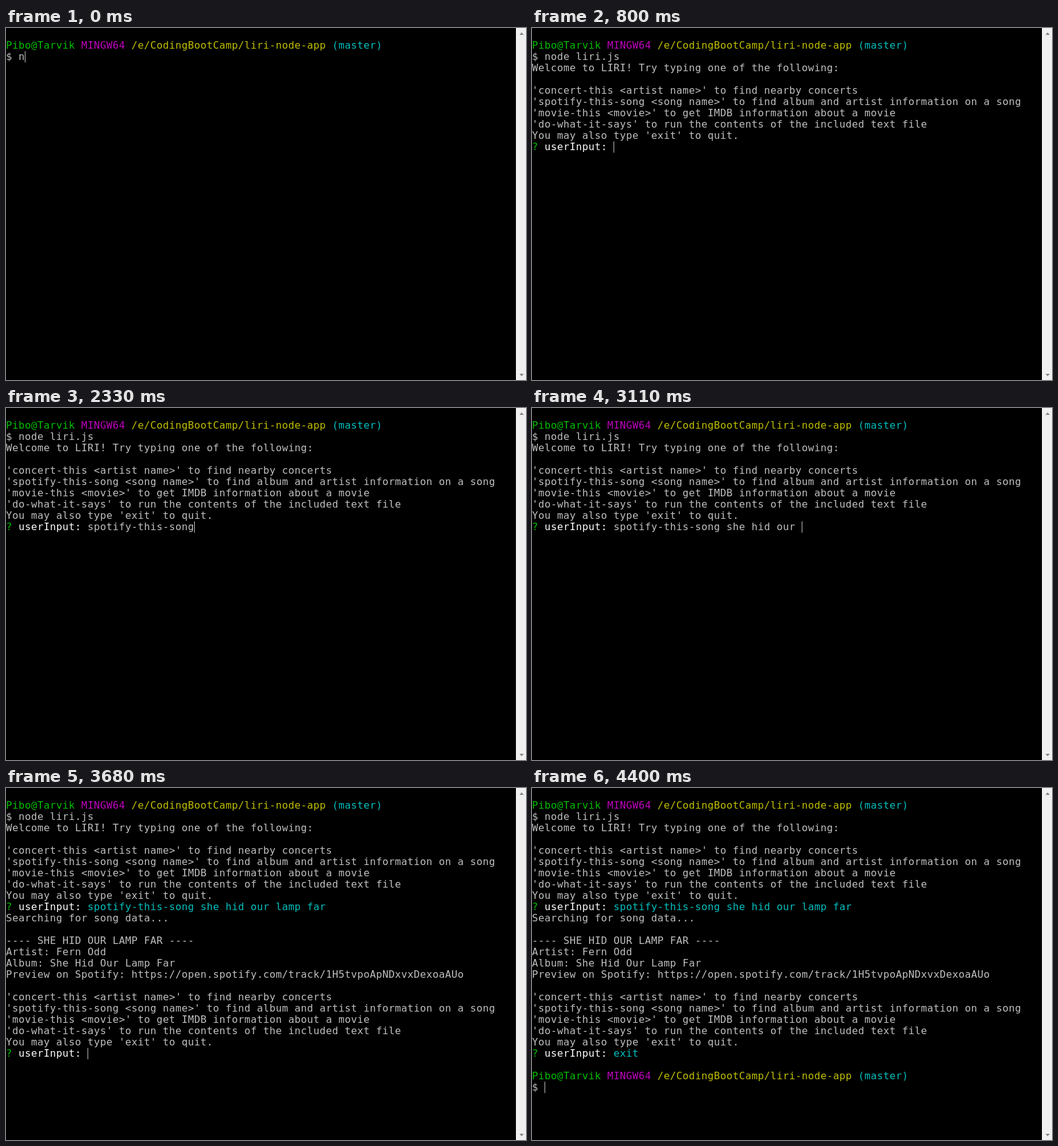
An HTML page for the animation above (4490 ms loop, 829x562 px).

```html
<!DOCTYPE html>
<html lang="en">
<head>
<meta charset="utf-8">
<title>Terminal session</title>
<style>
  html, body { margin: 0; width: 100%; height: 100%; overflow: hidden; background: #000; }
  #screen {
    position: absolute; left: 0; top: 1px; margin: 0; color: #bfbfbf;
    font: 16px/18px "DejaVu Sans Mono", monospace;
    letter-spacing: calc(10px - 1ch); /* 10px character cells */
    font-variant-ligatures: none; white-space: pre;
  }
  #cursor { position: absolute; width: 1px; height: 18px; background: #bfbfbf; }
  svg { position: absolute; left: 813px; top: 0; background: #f0f0f0; }
</style>
</head>
<body>
<pre id="screen"></pre>
<div id="cursor"></div>
<svg width="16" height="562" fill="#868686">
  <path d="M0 0H1V562H0Z" fill="#fff"/>
  <path d="M5.5 11 L9 7 L12.5 11Z M5.5 552 L9 556 L12.5 552Z"/>
</svg>
<script>
const LOOP = 4490;
const GREEN = '#00bf00', MAGENTA = '#bf00bf', YELLOW = '#bfbf00',
      CYAN = '#00bfbf', GREY = '#bfbfbf', WHITE = '#fff';

const song = 'she hid our lamp far';
const titleCase = song.replace(/\b\w/g, c => c.toUpperCase());
const query = 'spotify-this-song ' + song;
const command = 'node liri.js ';

const menu = `
'concert-this <artist name>' to find nearby concerts
'spotify-this-song <song name>' to find album and artist information on a song
'movie-this <movie>' to get IMDB information about a movie
'do-what-it-says' to run the contents of the included text file
You may also type 'exit' to quit.
`;
const result = `---- ${song.toUpperCase()} ----
Artist: Fern Odd
Album: ${titleCase}
Preview on Spotify: https://open.spotify.com/track/1H5tvpoApNDxvxDexoaAUo
`;

// A screen is a list of [text, colour] runs; the cursor follows the last one.
const shell = [
  ['\nPibo@Tarvik ', GREEN], ['MINGW64 ', MAGENTA],
  ['/e/CodingBootCamp/liri-node-app ', YELLOW], ['(master)\n', CYAN], ['$ ', GREY]
];
const ask = [['? ', GREEN], ['userInput: ', WHITE]];
const started = [...shell, [command + '\n', GREY]];
const listed = [...started, ['Welcome to LIRI! Try typing one of the following:\n' + menu, GREY]];
const prompt1 = [...listed, ...ask];
const searching = [...prompt1, [query + '\n', CYAN], ['Searching for song data...\n\n', GREY]];
const prompt2 = [...searching, [result + menu, GREY], ...ask];
const finished = [...prompt2, ['exit\n', CYAN], ...shell];

const steps = [];
const show = (time, runs, cursorOn = true) => steps.push({ time, runs, cursorOn });
const type = (runs, text, keys) =>
  keys.forEach(([time, n]) => show(time, [...runs, [text.slice(0, n), GREY]]));

type(shell, command, [[0, 1], [100, 4], [270, 5], [360, 6], [450, 13]]);
show(530, started);
show(730, listed);
show(800, prompt1);
show(960, prompt1, false);
type(prompt1, query, [
  [1120, 1], [1220, 2], [1310, 3], [1400, 5], [1500, 6],
  [1670, 7], [1770, 8], [1850, 10], [1930, 12], [2020, 14],
  [2230, 15], [2330, 17], [2580, 18],
  [2900, 20], [2970, 23], [3040, 26], [3110, 30], [3190, 32], [3280, 35], [3370, 37]
]);
show(3440, searching);
show(3680, prompt2);
show(3810, prompt2, false);
show(3950, prompt2);
type(prompt2, 'exit', [[4140, 1], [4230, 3], [4310, 4]]);
show(4400, finished);

const screenEl = document.getElementById('screen');
const cursorEl = document.getElementById('cursor');
let current;

function draw({ runs, cursorOn }) {
  screenEl.replaceChildren(...runs.map(([text, color]) => {
    const span = document.createElement('span');
    span.textContent = text;
    span.style.color = color;
    return span;
  }));
  const lines = runs.map(run => run[0]).join('').split('\n');
  cursorEl.style.left = lines.at(-1).length * 10 + 'px';
  cursorEl.style.top = (lines.length - 1) * 18 + 1 + 'px';
  cursorEl.hidden = !cursorOn;
}

function tick() {
  const time = performance.now() % LOOP;
  const step = steps.findLast(s => s.time <= time);
  if (step !== current) draw(current = step);
  requestAnimationFrame(tick);
}
tick();
</script>
</body>
</html>
```
